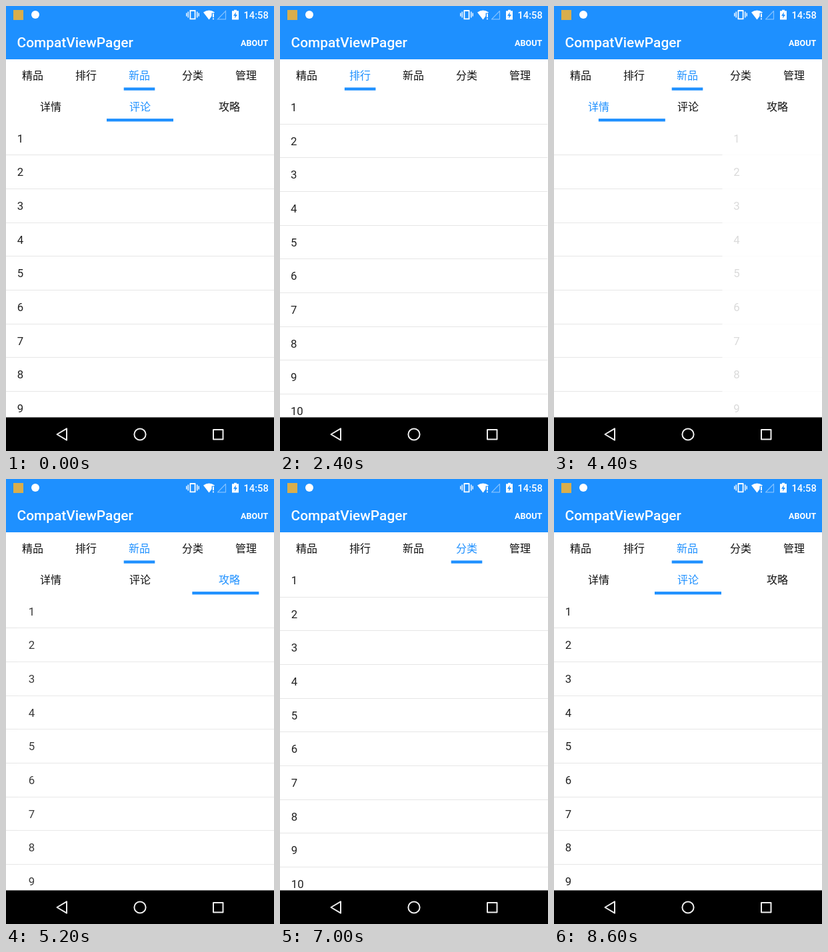
Animation of 402x668 px, one loop 8700 ms. Source, as an HTML page with a canvas:

```html
<!DOCTYPE html>
<html lang="zh">
<head>
<meta charset="utf-8">
<title>CompatViewPager</title>
<style>
html, body { margin: 0; width: 100%; height: 100%; overflow: hidden; background: #fff }
canvas { display: block; width: 402px; height: 668px }
</style>
</head>
<body>
<canvas id="stage"></canvas>
<script>
const W = 402, H = 668, LOOP = 8700, BLUE = '#1e90ff', ROW = 50.67;
const canvas = document.getElementById('stage');
const c = canvas.getContext('2d');
const dpr = window.devicePixelRatio || 1;
canvas.width = W * dpr;
canvas.height = H * dpr;
c.scale(dpr, dpr);

const TABS = ['精品', '排行', '新品', '分类', '管理'];
const SUBTABS = ['详情', '评论', '攻略'];
const CJK = '16px Roboto, "Noto Sans CJK SC", "Noto Sans CJK", sans-serif';

// Swipes: [start ms, end ms, from page, to page]
const OUTER = [
  [1914, 2414, 2, 1], [2750, 3150, 1, 0], [3180, 3590, 0, 1], [3615, 4165, 1, 2],
  [5300, 5800, 2, 3], [5843, 6343, 3, 4], [6450, 6950, 4, 3], [7115, 7615, 3, 2]
];
const INNER = [
  [1250, 1800, 1, 0], [4190, 4700, 0, 1], [4763, 5263, 1, 2], [7750, 8350, 2, 1]
];

const clamp = u => Math.min(1, Math.max(0, u));

function position(swipes, t) {
  let pos = swipes[0][2];
  for (const [start, end, from, to] of swipes) {
    if (t < start) break;
    const u = clamp((t - start) / (end - start));
    pos = from + (to - from) * u * u * (3 - 2 * u);
  }
  return pos;
}

// Pages still to the right of the screen are faded
const fade = p => p <= 0 ? 1 : 0.12 + 0.88 * (1 - clamp(p)) ** 3;

function rect(x, y, w, h, color) {
  c.fillStyle = color;
  c.fillRect(x, y, w, h);
}

function text(str, x, y, font, color, align = 'left') {
  c.font = font;
  c.fillStyle = color;
  c.textAlign = align;
  c.fillText(str, x, y);
}

function path(points, close = true) {
  c.beginPath();
  points.forEach(([x, y]) => c.lineTo(x, y));
  if (close) c.closePath();
}

function tabBar(labels, x, top, step, lineWidth, pos) {
  rect(x, top, W, 46.7, '#fff');
  labels.forEach((label, i) => text(label, x + step * (i + 0.5), top + 30, CJK,
    i === Math.round(pos) ? BLUE : '#111', 'center'));
  rect(x + step * (pos + 0.5) - lineWidth / 2, top + 42.4, lineWidth, 4.3, BLUE);
}

function list(x, top, alpha) {
  c.globalAlpha = alpha;
  for (let i = 0; top + i * ROW < 618; i++) {
    const y = top + i * ROW;
    text(i + 1, x + 16.75, y + 31.4, '16.75px Roboto, sans-serif', '#212121');
    rect(x, Math.round(y + ROW - 0.7), W, 1, '#e6e6e6');
  }
  c.globalAlpha = 1;
}

function nestedPage(x, outerFade, inner, t) {
  c.save();
  c.beginPath();
  c.rect(x, 80, W, 538);
  c.clip();
  for (let i = 0; i < 3; i++) {
    const p = i - inner;
    if (Math.abs(p) < 1) list(x + p * W, 173.3, outerFade * fade(p));
  }
  const bar = clamp((t - 7115) / 200) * clamp((8000 - t) / 300);
  if (bar > 0) {
    c.globalAlpha = bar;
    rect(x + (2 - inner) * W + 395, 176.5, 4, 128, '#ccc');
    c.globalAlpha = 1;
  }
  tabBar(SUBTABS, x, 126.7, 134, 100, inner);
  c.restore();
}

function statusBar() {
  rect(11, 6, 15, 15, '#d9ae4c');
  c.fillStyle = '#fff';
  c.beginPath();
  c.arc(44, 13, 6, 0, 7);
  c.fill();

  // vibrate
  c.strokeStyle = '#fff';
  c.lineWidth = 1.8;
  c.strokeRect(276.4, 7, 7.2, 12.4);
  for (const d of [-1, 1]) {
    rect(280 + d * 6.8 - 0.7, 8.5, 1.4, 9, '#fff');
    rect(280 + d * 9.2 - 0.7, 10.5, 1.4, 5, '#fff');
  }

  // wifi with alert mark
  c.beginPath();
  c.moveTo(304.5, 20.5);
  c.lineTo(296, 9.5);
  c.quadraticCurveTo(304.5, 3.5, 313, 9.5);
  c.fill();
  rect(308.6, 10.5, 5, 11, BLUE);
  rect(310, 11.5, 1.9, 5.5, '#fff');
  rect(310, 18.4, 1.9, 1.9, '#fff');

  // empty signal
  c.strokeStyle = 'rgba(255,255,255,.45)';
  c.lineWidth = 1.2;
  path([[317.5, 19.8], [329.5, 19.8], [329.5, 7.5]]);
  c.stroke();

  // charging battery
  rect(339, 7.3, 10, 13.2, '#fff');
  rect(342, 5.8, 4, 2, '#fff');
  c.fillStyle = BLUE;
  path([[345, 9], [341, 14.8], [343.6, 14.8], [343, 18.8], [347, 13], [344.4, 13]]);
  c.fill();

  text('14:58', 356.5, 19, '500 14.66px Roboto, sans-serif', '#fff');
}

function header() {
  rect(0, 0, W, 80, BLUE);
  statusBar();
  text('CompatViewPager', 16.5, 62.2, '500 20.9px Roboto, sans-serif', '#fff');
  text('ABOUT', 352, 60.3, '700 12.57px Roboto, sans-serif', '#fff');
}

function navBar() {
  rect(0, 617.5, W, 50.5, '#000');
  c.strokeStyle = '#eee';
  c.lineWidth = 2;
  c.lineJoin = 'round';
  path([[76.5, 643], [91, 634.3], [91, 651.7]]);
  c.stroke();
  c.beginPath();
  c.arc(201, 643, 8.6, 0, 7);
  c.stroke();
  c.strokeRect(311, 636, 14.5, 14.5);
}

function draw(now) {
  const t = now % LOOP;
  const outer = position(OUTER, t), inner = position(INNER, t);
  rect(0, 0, W, H, '#fff');
  TABS.forEach((_, i) => {
    const p = i - outer;
    if (Math.abs(p) >= 1) return;
    if (i === 2) nestedPage(p * W, fade(p), inner, t);
    else list(p * W, 126.7, fade(p));
  });
  tabBar(TABS, 0, 80, 80, 46.6, outer);
  header();
  navBar();
  requestAnimationFrame(draw);
}
requestAnimationFrame(draw);
</script>
</body>
</html>
```
